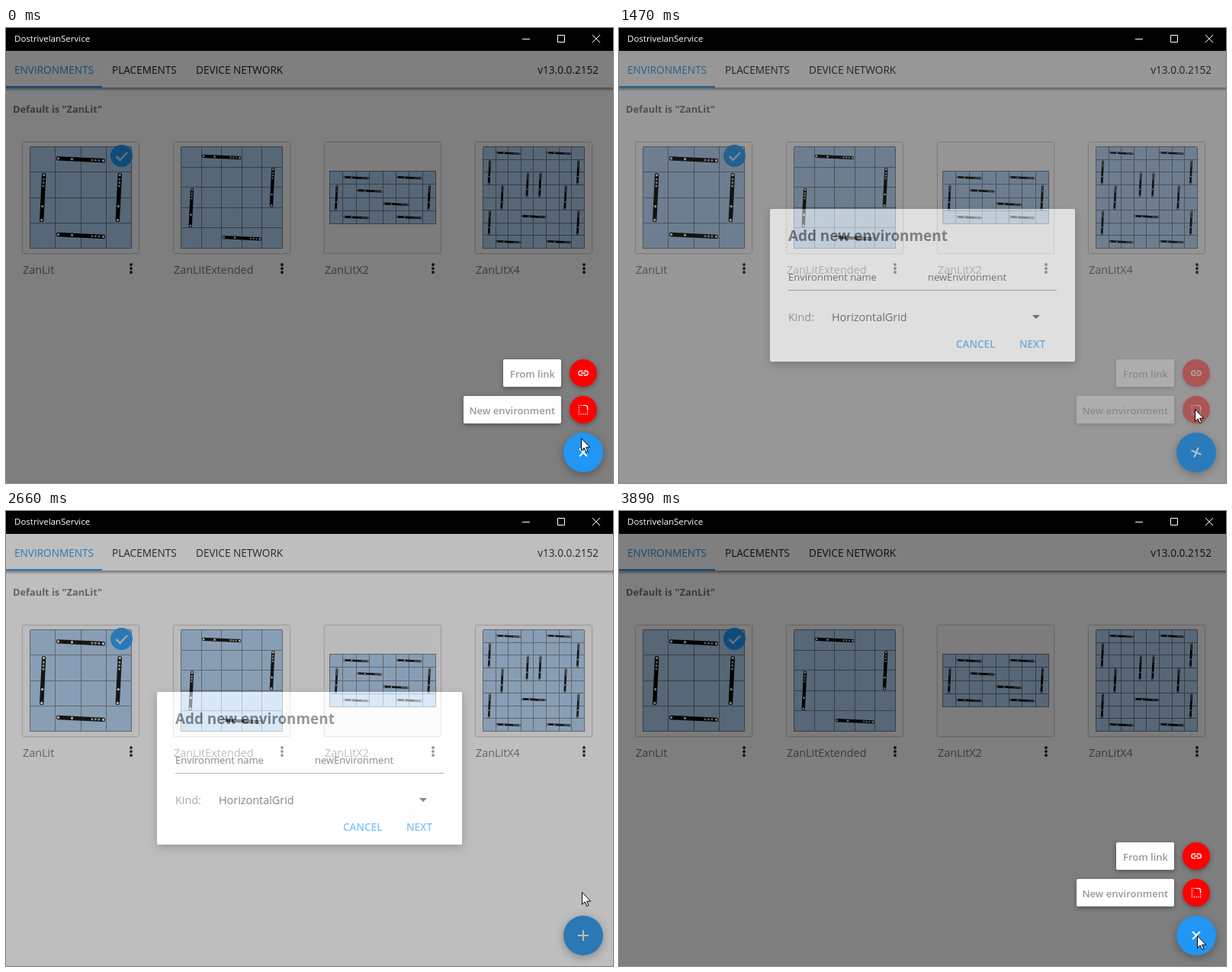
Write an HTML page that moves like this. It is 796 px wide and 596 px high and loops after 4030 ms.

```html
<!DOCTYPE html>
<html lang="en">
<head>
<meta charset="utf-8">
<title>Environments</title>
<style>
  html, body { margin: 0; width: 100%; height: 100%; overflow: hidden; background: #fefefe; }
  svg { display: block; width: 796px; height: 596px; font-family: "Open Sans", "Noto Sans", sans-serif; }
  .tab { font-size: 13.6px; fill: #1c1c1c; }
  .label { font-size: 14.4px; fill: #757575; }
  .lines { fill: none; stroke: #737a82; shape-rendering: crispEdges; }
  .cells { fill: #adcff0; }
  .card { fill: #fafafa; filter: drop-shadow(0 .5px 1.3px rgba(0,0,0,.55)); }
  .lift { filter: drop-shadow(0 2px 3px rgba(0,0,0,.35)); }
  .float { filter: drop-shadow(0 3px 6px rgba(0,0,0,.32)); }
  .sheet { fill: #fff; filter: drop-shadow(0 4px 6px rgba(0,0,0,.5)); }
  .blue { fill: #2196f3; }
  .icon { fill: none; stroke: #fff; }
  .hint { font-size: 13px; font-weight: 600; fill: #999; text-anchor: end; }
  .action { font-size: 13.5px; font-weight: 600; fill: #2196f3; }
</style>
</head>
<body>
<svg viewBox="0 0 796 596">
  <defs>
    <linearGradient id="fade" x2="0" y2="1">
      <stop offset="0" stop-color="#000" stop-opacity=".42"/>
      <stop offset="1" stop-color="#000" stop-opacity="0"/>
    </linearGradient>
  </defs>

  <rect width="796" height="596" fill="#fefefe"/>
  <rect y="78" width="796" height="5" fill="url(#fade)"/>
  <rect y="30" width="796" height="48" fill="#fff"/>
  <g class="tab">
    <text class="blue" x="11" y="60">ENVIRONMENTS</text>
    <text x="139" y="60">PLACEMENTS</text>
    <text x="249" y="60">DEVICE NETWORK</text>
    <text x="777" y="60" text-anchor="end">v13.0.0.2152</text>
  </g>
  <rect class="blue" y="76" width="126" height="2"/>
  <text x="9" y="111" font-size="12.8" font-weight="700" fill="#757575">Default is "ZanLit"</text>
  <g id="cards"></g>
  <circle class="blue" cx="151.5" cy="167.5" r="14.5"/>
  <path d="M144.5 168 149.5 173 159 163" fill="none" stroke="#c4e2fb" stroke-width="2.5"/>

  <rect id="dim" y="30" width="796" height="566"/>
  <g transform="translate(757 556)">
    <circle class="blue float" r="26"/>
    <path id="plus" class="icon" d="M-7 0H7M0-7V7" stroke-width="2"/>
  </g>

  <g id="menu">
    <g class="lift">
      <rect x="652" y="434" width="76" height="36" rx="2" fill="#fff"/>
      <rect x="600" y="482" width="128" height="36" rx="2" fill="#fff"/>
      <circle cx="757" cy="452" r="18" fill="#f00"/>
      <circle cx="757" cy="500" r="18" fill="#f00"/>
    </g>
    <text class="hint" x="720" y="458">From link</text>
    <text class="hint" x="720" y="506">New environment</text>
    <g class="icon" stroke-width="2">
      <path transform="translate(748.6 443.6) scale(.7)" d="M11 8H7a4 4 0 0 0 0 8h4M13 8h4a4 4 0 0 1 0 8h-4M8 12h8"/>
      <g transform="translate(748.6 491.6) scale(.7)">
        <path d="M11 4H16A4 4 0 0 1 20 8V13"/>
        <path d="M9 4H3M4 3V21M3 20H21M20 21V15" stroke-dasharray="2"/>
      </g>
    </g>
    <circle id="ripple" cx="755" cy="500" r="12.5" fill="#ffb81c" opacity=".68"/>
  </g>

  <g id="popup">
    <rect y="30" width="796" height="566" fill="#404040" opacity=".62"/>
    <rect class="sheet" x="198" y="237" width="400" height="200" rx="2"/>
    <text x="222" y="279" font-size="18.9" font-weight="700" fill="#444">Add new environment</text>
    <g font-size="13" fill="#222">
      <text x="222" y="331">Environment name</text>
      <text x="405" y="331">newEnvironment</text>
    </g>
    <path d="M222 343.5H574" stroke="#777"/>
    <g font-size="14.4">
      <text x="222" y="384" fill="#666">Kind:</text>
      <text x="279" y="384" fill="#222">HorizontalGrid</text>
    </g>
    <path d="M542 376H552L547 381Z" fill="#222"/>
    <text class="action" x="442" y="419">CANCEL</text>
    <text class="action" x="525" y="419">NEXT</text>
  </g>

  <rect width="796" height="30"/>
  <text x="11" y="18" font-size="11.5" fill="#fff">DostrivelanService</text>
  <path class="icon" d="M677 14.5H687M723.5 9.5H732.5V18.5H723.5ZM769 9 779 19M779 9 769 19"/>

  <path id="cursor" d="M.5.5V16.5L4.2 13 6.7 18.6 9 17.6 6.5 12.2H11.7Z" fill="#fff" stroke="#000"/>
</svg>
<script>
const $ = id => document.getElementById(id);

function add(parent, tag, attrs, text) {
  const el = document.createElementNS('http://www.w3.org/2000/svg', tag);
  for (const key in attrs) el.setAttribute(key, attrs[key]);
  if (text) el.textContent = text;
  parent.append(el);
  return el;
}

// Bar centres in cells; each bar has a twin, mirrored left to right or turned by half
const layouts = [
  { name: 'ZanLit', cols: 4, rows: 4, turned: true, across: [[2, .5]], upright: [[.5, 2]] },
  { name: 'ZanLitExtended', cols: 5, rows: 5, turned: true, across: [[2, .5]], upright: [[4.5, 2]] },
  { name: 'ZanLitX2', cols: 8, rows: 4, turned: true, across: [[2, .5], [6, .5], [3, 1.5]], upright: [[.5, 2]] },
  { name: 'ZanLitX4', cols: 8, rows: 8, turned: false,
    across: [[2, .5], [4, 5.5], [2, 7.5]], upright: [[.5, 2], [3.5, 3], [1.5, 4], [.5, 6]] }
];

function addBar(parent, x, y, cell, angle) {
  const g = add(parent, 'g', {
    transform: `translate(${x * cell} ${y * cell}) rotate(${angle}) scale(${cell / 33.2})`
  });
  add(g, 'rect', { x: -32, y: -2.7, width: 64, height: 5.4, rx: 2 });
  for (const cx of [-29.5, -11.5, 29.5]) add(g, 'circle', { cx, r: 1.7, fill: '#eee' });
  for (let i = 0; i < 3; i++) add(g, 'circle', { cx: 15 + 4.5 * i, r: 1.5, fill: '#bbb' });
}

layouts.forEach(({ name, cols, rows, turned, across, upright }, i) => {
  const left = 22 + 198 * i;
  const cell = Math.min(138.8 / cols, 132.8 / rows);
  const w = cols * cell, h = rows * cell;
  const box = $('cards');
  add(box, 'rect', { class: 'card', x: left, y: 150, width: 152, height: 145, rx: 1 });

  const grid = add(box, 'g', { transform: `translate(${left + 76 - w / 2} ${222.1 - h / 2})` });
  let d = '';
  for (let c = 0; c <= cols; c++) d += `M${c * cell} 0V${h}`;
  for (let r = 0; r <= rows; r++) d += `M0 ${r * cell}H${w}`;
  add(grid, 'rect', { class: 'cells', width: w, height: h });
  add(grid, 'path', { class: 'lines', d });

  const addPairs = (points, angle) => points.forEach(([x, y]) => {
    addBar(grid, x, y, cell, angle);
    addBar(grid, cols - x, turned ? rows - y : y, cell, angle);
  });
  addPairs(across, 2.8);
  addPairs(upright, -87.2);

  add(box, 'text', { class: 'label', x: left, y: 322 }, name);
  for (let k = 0; k < 3; k++)
    add(box, 'circle', { cx: left + 142, cy: 310 + 5 * k, r: 1.9, fill: '#1c1c1c' });
});

const LOOP = 4030;

// Progress from 0 to 1 in n even jumps, the first at `from` and the last at `to`
function jumps(t, from, to, n) {
  const done = Math.floor((t - from) / (to - from) * (n - 1) + 1e-6) + 1;
  return Math.min(Math.max(done, 0), n) / n;
}
const easeOut = (k, power) => 1 - (1 - k) ** power;
const bow = k => Math.sin(Math.PI * k);

function draw(t) {
  const up = jumps(t, 120, 560, 5);
  const down = jumps(t, 2910, 3450, 6);
  const opened = jumps(t, 1470, 1590, 2);
  const closed = jumps(t, 2590, 2800, 4);
  const menu = 1 - opened + jumps(t, 3670, 3890, 3);

  const nudge = t >= 680 ? 1 : 0;
  const x = Math.round(754 - 5 * bow(up) + nudge + 3 * down + 3.5 * bow(down));
  const y = Math.round(537 - 38 * easeOut(up, 2) + 59 * easeOut(down, 2.4) - 2 * down);
  $('cursor').setAttribute('transform', `translate(${x} ${y})`);
  $('plus').setAttribute('transform', `rotate(${45 * menu})`);
  $('dim').style.opacity = menu / 2;
  $('menu').style.opacity = menu;
  $('popup').style.opacity = opened * (1 - closed) ** .88;
  $('ripple').style.visibility = t >= 1350 && t < 1470 ? 'inherit' : 'hidden';
}

const start = performance.now();
function tick() {
  draw((performance.now() - start) % LOOP);
  requestAnimationFrame(tick);
}
tick();
</script>
</body>
</html>
```
